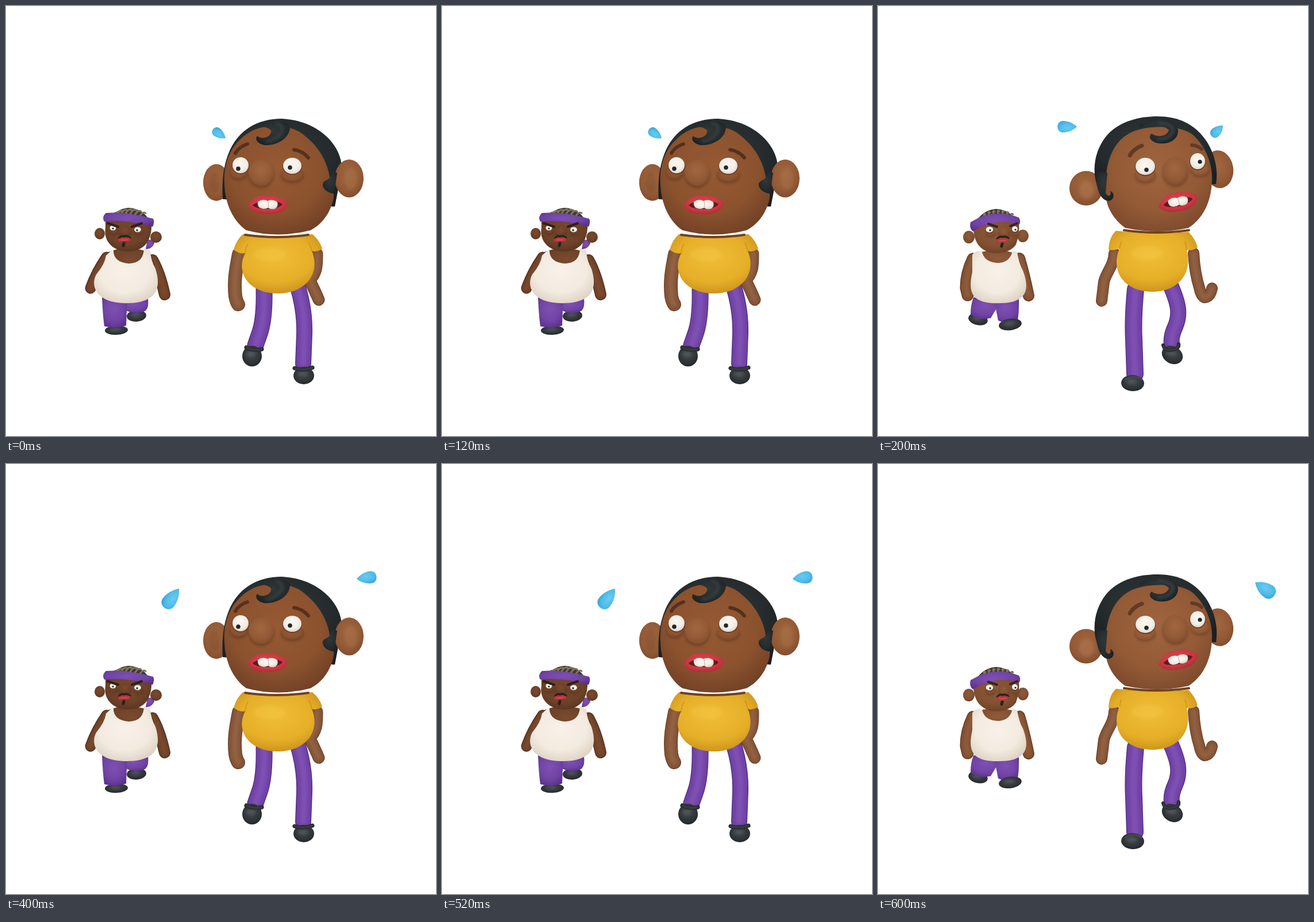
Write an HTML page that moves like this. It is 748 px wide and 748 px high and loops after 0.8 s.

```html
<!DOCTYPE html>
<html lang="en">
<head>
<meta charset="utf-8">
<title>Worried walk</title>
<style>
html, body { margin: 0; width: 100%; height: 100%; overflow: hidden; background: #fff; }
svg { display: block; width: 100%; height: 100%; }
</style>
</head>
<body>
<svg id="stage" viewBox="0 0 748 748"></svg>
<script>
const LOOP = 800, STEP = 200;

// Clay colours: lit middle, base, shaded rim
const CLAY = {
  skin: ['#965a34', '#8b522e', '#6d3d24'],
  face: ['#9f653f', '#935a36', '#7a472b'],
  tan: ['#a0673f', '#935a36', '#7c4a2c'],
  limb: ['#936244', '#835436', '#74462d'],
  dark: ['#7a4a2f', '#6d4228', '#55301e'],
  umber: ['#8e5c3c', '#815031', '#683c24'],
  hair: ['#303739', '#262c2e', '#1b1f21'],
  shoe: ['#42474a', '#303538', '#1f2325'],
  gold: ['#f0bd38', '#e6af28', '#c48a18'],
  cream: ['#f8f1e9', '#f3ebe0', '#dacdbf'],
  purple: ['#7f50b4', '#7043a4', '#572f88'],
  white: ['#fbf8f2', '#f3eee6', '#d6cbbe'],
  lip: ['#da4850', '#ca3841', '#a62a34'],
  water: ['#68cbf2', '#50bbe8', '#36a0d0']
};

const paint = c => CLAY[c] ? `url(#${c})` : c;
const oval = (x, y, rx, ry, c, turn = 0) =>
  `<ellipse cx="${x}" cy="${y}" rx="${rx}" ry="${ry}" fill="${paint(c)}" transform="rotate(${turn} ${x} ${y})"/>`;
const shape = (d, c) => `<path d="${d}" fill="${paint(c)}"/>`;
const line = (d, w, c, extra = '') =>
  `<path d="${d}" fill="none" stroke="${c}" stroke-width="${w}" stroke-linecap="round" stroke-linejoin="round" ${extra}/>`;
const soft = (x, y, rx, ry, c, alpha) =>
  `<g opacity="${alpha}" filter="url(#blur)">${oval(x, y, rx, ry, c)}</g>`;

// A rolled piece of clay with a soft light along its middle
function roll(d, w, c) {
  const [light, base, rim] = CLAY[c];
  return line(d, w, rim) + line(d, w - 3, base) +
    line(d, w * 0.4, light, 'filter="url(#blur)"');
}

function eye(x, y, rx, ry, px, py, pr) {
  return oval(x, y + 1, rx + 1, ry + 1, '#6b3e26') + oval(x, y, rx, ry, 'white') +
    oval(px, py, pr, pr, '#23272b');
}

function nose(x, y, rx, ry, c) {
  return soft(x, y + 4, rx, ry, '#4a2614', 0.4) + oval(x, y, rx, ry, c);
}

function bag(x, y, rx, ry, c) {
  return soft(x, y + 2, rx, ry, '#4f2a17', 0.4) + oval(x, y, rx, ry, c);
}

function bigMouth(x, y, turn) {
  return `<g transform="translate(${x} ${y}) rotate(${turn})">` +
    shape('M-35 2C-28-8-16-19-5-16C6-19 30-14 35-3C34 9 18 17 0 16C-18 17-30 12-35 2Z', 'lip') +
    shape('M-26 1C-17-9 15-10 26-2C22 8-18 11-26 1Z', '#641b20') +
    shape('M-17-5Q-9-11 0-7Q9-11 17-5Q19 2 14 6Q6 9 1 5Q-7 9-14 5Q-18 1-17-5Z', 'white') +
    line('M1-6L2 5', 1, '#bdb0a3') + '</g>';
}

function smallMouth(x, y) {
  return line(`M${x - 9} ${y - 2}Q${x - 3} ${y - 8} ${x} ${y - 5}Q${x + 5} ${y - 8} ${x + 11} ${y - 3}`, 3, '#29211d') +
    line(`M${x - 7} ${y + 1}Q${x} ${y - 1} ${x + 8} ${y}`, 6, '#c3333d') +
    line(`M${x - 5} ${y + 1}H${x + 6}`, 1.2, '#e3646a') +
    line(`M${x} ${y + 7}L${x - 1} ${y + 11}`, 5, '#29211d');
}

function braids(x, y, lean) {
  let s = shape(`M${x - 33} ${y + 12}Q${x - 20} ${y - 5} ${x} ${y - 6}Q${x + 24} ${y - 4} ${x + 34} ${y + 14}Z`, '#3f3a33');
  for (let i = -3; i <= 3; i++) {
    const px = x + i * 8, py = y - 4 + i * i * 0.6;
    s += line(`M${px - lean} ${py + 8}Q${px} ${py - 2} ${px + 5} ${py + 2}`, 3, '#82765f');
  }
  return s;
}

function shoe(x, y, rx, ry, turn = 0) {
  return oval(x, y, rx, ry, 'shoe', turn) + soft(x - 2, y - ry * 0.2, rx * 0.5, ry * 0.3, '#565c60', 0.7);
}

function bigA() {
  return roll('M541 431C541 452 541 464 528 477Q536 492 544 511', 21, 'limb') +
    roll('M405 432C400 458 396 478 399 505Q401 515 404 519', 24, 'limb') +
    roll('M449 493Q450 545 441 570L434 590', 29, 'purple') +
    roll('M508 490Q520 530 519 570L517 622', 28, 'purple') +
    shoe(428, 609, 17, 18) + roll('M418 594Q430 600 445 597', 7, 'shoe') +
    shoe(518, 643, 18, 15) + roll('M502 630Q518 635 533 629', 7, 'shoe') +
    shape('M412 397Q472 404 533 397Q546 408 550 422Q541 429 532 426C548 465 522 500 472 500C424 500 398 465 416 430Q406 432 396 424Q400 408 412 397Z', 'gold') +
    line('M416 430Q417 419 421 414M532 426Q530 417 527 412', 2, '#b98112', 'opacity=".45"') +
    soft(459, 432, 28, 12, '#f6c847', 0.4) +
    line('M416 398Q472 406 526 398', 4, '#71411f') +
    oval(366, 307, 23, 32, 'tan') + soft(363, 307, 9, 18, '#693b22', 0.25) +
    shape('M377 336C371 240 416 196 480 196C552 200 591 253 583 292L572 349Z', 'hair') +
    shape('M380 310C377 270 394 234 430 216C460 203 500 207 520 226C550 250 562 280 564 305C570 317 573 330 567 345C560 366 547 381 530 390Q472 405 418 390C396 375 381 345 380 310Z', 'skin') +
    oval(597, 300, 25, 33, 'tan') + soft(600, 300, 11, 19, '#a97249', 0.5) +
    shape('M551 309C554 301 565 305 567 288L576 290L571 326C560 326 550 318 551 309Z', 'hair') +
    shape('M445 209C465 195 493 199 494 212C492 232 470 243 450 242C438 240 432 232 437 226C443 232 458 230 461 220C463 214 455 212 445 209Z', 'hair') +
    line('M470 204Q484 207 479 220Q469 234 453 236', 3, '#414a4c', 'filter="url(#blur)"') +
    line('M399 256Q405 245 420 240', 6, '#56301f') +
    line('M501 250Q516 252 526 264', 6, '#56301f') +
    bag(405, 289, 15, 13, 'skin') + bag(498, 294, 20, 13, 'skin') +
    eye(408, 277, 14, 14, 404, 283, 3.8) + eye(498, 278, 16, 14, 494, 281, 3.8) +
    nose(444, 290, 22, 23, 'tan') + bigMouth(455, 346, 1);
}

function bigB() {
  return roll('M411 430C411 450 396 465 393 480L389 513', 20, 'limb') +
    roll('M549 430Q551 465 559 490Q562 505 568 507Q578 506 581 491', 20, 'limb') +
    roll('M448 493Q443 545 445 580L447 640', 30, 'purple') +
    roll('M509 486C522 516 527 535 517 558Q509 575 511 588', 28, 'purple') +
    shoe(512, 607, 19, 15, 28) + roll('M496 590Q499 601 512 598Q524 596 523 588', 6, 'shoe') +
    shoe(443, 656, 20, 14, 3) + line('M430 650Q444 640 459 650', 3, '#44494c') +
    shape('M414 391Q477 398 540 393Q552 405 556 420Q546 427 537 424C548 465 522 497 477 497C427 497 404 460 420 422Q410 426 401 424Q402 402 414 391Z', 'gold') +
    line('M420 422L423 410M537 424L534 410', 2, '#b98112', 'opacity=".45"') +
    soft(468, 430, 28, 12, '#f6c847', 0.4) +
    line('M428 390Q485 398 541 390', 4, '#71411f') +
    oval(362, 317, 29, 30, 'tan') + soft(363, 320, 13, 15, '#ae7450', 0.6) +
    oval(593, 284, 25, 33, 'tan', -8) +
    shape('M381 312C372 285 376 250 400 223C422 200 455 192 486 192C530 192 556 212 572 236C586 258 592 285 588 310Z', 'hair') +
    shape('M396 320C394 270 410 236 438 221C465 207 520 206 545 222C570 242 582 275 581 303C580 345 562 372 540 386Q488 398 430 386C408 370 394 345 396 320Z', 'face') +
    shape('M379 288C379 322 388 339 402 339C412 337 412 324 404 322C407 330 400 334 396 325L399 290Z', 'hair') +
    shape('M455 207C480 190 520 196 522 217C522 236 500 242 484 238C472 234 470 226 476 222C488 230 503 226 506 216C500 208 480 206 455 212Z', 'hair') +
    line('M488 203Q515 205 513 218Q508 232 487 232', 3, '#414a4c', 'filter="url(#blur)"') +
    line('M438 260Q445 248 459 243', 7, '#633a25') +
    line('M546 242Q557 243 563 249', 6, '#633a25') +
    bag(465, 294, 18, 13, 'face') + bag(560, 284, 16, 12, 'face') +
    eye(465, 279, 17, 15, 467, 285, 3.8) + eye(556, 270, 13, 14, 560, 271, 3.6) +
    nose(517, 287, 22, 24, 'tan') + bigMouth(522, 341, -10);
}

function smallA() {
  return shape('M246 407Q258 405 258 413Q254 423 243 423Z', 'purple') +
    roll('M175 437Q157 463 147 491', 19, 'dark') +
    roll('M255 442Q268 465 276 502', 20, 'dark') +
    shoe(227, 539, 17, 10, -4) +
    shape('M198 508H247Q249 524 243 530Q228 538 209 530Z', 'purple') +
    shoe(192, 564, 20, 8, -2) +
    shape('M167 505H211L209 556Q190 562 171 557Q168 535 167 505Z', 'purple') +
    shape('M178 428Q209 415 250 428L259 450L242 470H180Z', 'dark') +
    shape('M174 434L187 422Q185 446 214 448Q240 447 240 421L251 426Q252 443 260 457C271 491 262 517 209 517C157 517 146 487 157 467Q172 449 174 434Z', 'cream') +
    oval(163, 396, 9, 10, 'dark') + oval(261, 402, 10, 10, 'dark') +
    braids(214, 357, 6) +
    shape('M173 370Q210 357 253 379Q254 394 248 407Q238 427 211 427C184 426 169 407 173 386Z', 'dark') +
    shape('M174 360Q212 357 256 370Q259 376 255 384Q210 371 171 375Q166 367 174 360Z', 'purple') +
    bag(187, 391, 8, 6, 'dark') + bag(230, 393, 9, 6, 'dark') +
    eye(186, 386, 5.5, 4.5, 186, 387, 1.6) + eye(229, 389, 6, 4.5, 228, 390, 1.7) +
    line('M177 378L195 384', 4, '#2c211b') + line('M219 384L236 378', 4, '#2c211b') +
    nose(207, 391, 11, 10, 'dark') + smallMouth(205, 406);
}

function smallB() {
  return roll('M165 440Q153 465 153 490L156 503', 21, 'umber') +
    roll('M246 439Q254 465 262 504', 20, 'umber') +
    shoe(174, 545, 17, 10, 12) +
    shape('M166 507H216Q207 526 196 543Q177 547 161 537Q161 520 166 507Z', 'purple') +
    shape('M201 507H245Q246 528 243 548Q225 555 209 547Z', 'purple') +
    shoe(230, 554, 20, 10, -8) +
    shape('M174 430Q208 418 243 432L252 460H170Z', 'umber') +
    shape('M164 433Q170 424 181 427Q184 446 210 447Q231 445 234 425L242 428Q245 447 252 460C265 494 259 517 210 517C160 518 157 496 164 463Z', 'cream') +
    oval(158, 402, 10, 11, 'umber') + oval(252, 400, 10, 11, 'umber') +
    braids(206, 359, -4) +
    shape('M166 388Q205 360 245 376Q247 396 240 415Q229 430 205 430C180 429 167 413 166 388Z', 'umber') +
    shape('M161 376Q202 350 245 368Q249 374 246 380Q204 367 165 392Q158 386 161 376Z', 'purple') +
    bag(196, 395, 9, 6, 'umber') + bag(239, 393, 6, 6, 'umber') +
    eye(194, 389, 6.5, 5, 195, 390, 1.7) + eye(238, 388, 5, 5, 239, 389, 1.6) +
    line('M192 379L207 384', 4, '#35261d') + line('M230 383L242 378', 4, '#35261d') +
    nose(219, 393, 10, 10, 'umber') + smallMouth(216, 407);
}

// Tip position, direction of the round end, length and half width
function drop(x, y, turn, len, r) {
  return `<g transform="translate(${x} ${y}) rotate(${turn})">` +
    shape(`M0 0C${len * 0.2} ${-r * 0.65} ${len * 0.45} ${-r} ${len - r} ${-r}` +
      `C${len + r * 0.3} ${-r} ${len + r * 0.3} ${r} ${len - r} ${r}` +
      `C${len * 0.45} ${r} ${len * 0.2} ${r * 0.65} 0 0Z`, 'water') + '</g>';
}

const drops = [
  drop(382, 230, 215, 27, 8),
  drop(346, 210, 180, 34, 10) + drop(600, 208, 137, 27, 8.5),
  drop(301, 217, 128, 42, 12) + drop(610, 200, -7, 35, 10.5),
  drop(656, 206, 34, 41, 12.5)
];

const gradients = Object.entries(CLAY).map(([id, [a, b, c]]) =>
  `<radialGradient id="${id}" cx=".48" cy=".4" r=".68"><stop stop-color="${a}"/>` +
  `<stop offset=".6" stop-color="${b}"/><stop offset="1" stop-color="${c}"/></radialGradient>`).join('');

const stage = document.getElementById('stage');
stage.innerHTML = `<defs>${gradients}<filter id="blur" filterUnits="userSpaceOnUse" x="0" y="0" width="748" height="748" color-interpolation-filters="sRGB">` +
  `<feGaussianBlur stdDeviation="2.5"/></filter></defs>` +
  `<g class="pose">${smallA() + bigA()}</g><g class="pose">${smallB() + bigB()}</g>` +
  drops.map(d => `<g class="drops">${d}</g>`).join('');

const poses = stage.querySelectorAll('.pose');
const sprays = stage.querySelectorAll('.drops');
const showOnly = (list, n) => list.forEach((g, i) => g.setAttribute('display', i === n ? 'inline' : 'none'));

let shown = -1;
function draw(time) {
  const beat = Math.floor((time % LOOP) / STEP);
  if (beat === shown) return;
  shown = beat;
  showOnly(poses, beat % 2);
  showOnly(sprays, beat);
}

function tick() {
  draw(performance.now());
  requestAnimationFrame(tick);
}
tick();
</script>
</body>
</html>
```
